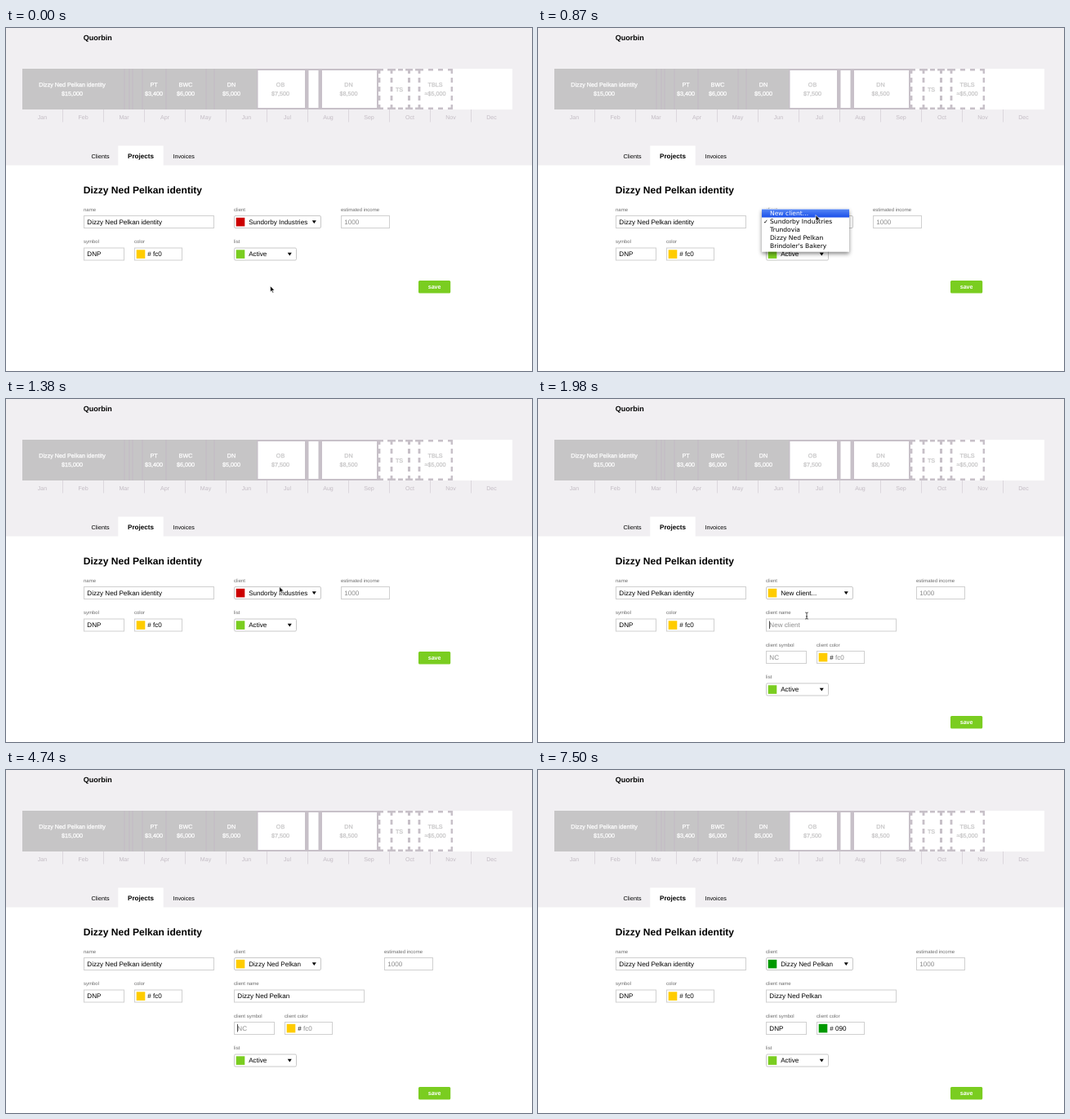
Animation, 644 px wide and 421 px high, one loop 7.53 s. Source, as an HTML page:

```html
<!DOCTYPE html>
<html lang="en">
<head>
<meta charset="utf-8">
<title>Project form</title>
<style>
  html, body { margin: 0; width: 100%; height: 100%; overflow: hidden; background: #fff; }
  svg { display: block; width: 100vw; height: 100vh; }
  text {
    font-family: "Liberation Sans", Arial, sans-serif;
    white-space: pre;
    text-rendering: geometricPrecision;
  }
  .menu text { font-family: "DejaVu Sans", sans-serif; }
</style>
</head>
<body>
<svg id="stage" viewBox="0 0 644 421"></svg>
<script>
const NS = "http://www.w3.org/2000/svg";
const LOOP = 7530;
const stage = document.getElementById("stage");
const PERSON = "Dizzy Ned Pelkan";
const SYMBOL = "DNP";
const PROJECT = PERSON + " identity";
const OLD_CLIENT = "Sundorby Industries";
const NEW_CLIENT = "New client...";
const INK = "#000", GRAY = "#c6c5c6", LILAC = "#c7c0c8", HINT = "#8c8c8c";
const YELLOW = "#fc0", GREEN = "#7acd20";

function add(parent, tag, attrs) {
  const node = document.createElementNS(NS, tag);
  for (const key in attrs) node.setAttribute(key, attrs[key]);
  parent.appendChild(node);
  return node;
}
const group = (parent, attrs = {}) => add(parent, "g", attrs);
const rect = (parent, x, y, width, height, fill, attrs = {}) =>
  add(parent, "rect", { x, y, width, height, fill, ...attrs });
const path = (parent, d, attrs) => add(parent, "path", { d, fill: "none", ...attrs });
function text(parent, x, y, size, content, attrs = {}) {
  const node = add(parent, "text", { x, y, "font-size": size, fill: INK, ...attrs });
  node.textContent = content;
  return node;
}
const bold = { "font-weight": 700 };
const mid = { "text-anchor": "middle" };
const show = (node, on) => node.setAttribute("visibility", on ? "visible" : "hidden");
const move = (node, x, y) => node.setAttribute("transform", `translate(${x} ${y})`);
const setFill = (node, color) => node.setAttribute("fill", color);

// Form parts
const label = (parent, x, y, content) => text(parent, x, y, 6, content, { fill: "#6c6c6c" });
const box = (parent, x, y, w, stroke = "#d0d0d0", rx = 0) =>
  rect(parent, x + .5, y + .5, w - 1, 15, "#fff", { stroke, rx });
const swatchAt = (parent, x, y, color) => rect(parent, x + 2.7, y + 2.8, 10.6, 10.6, color);
function field(parent, x, y, w, name, value, color = INK) {
  label(parent, x, y - 5.5, name);
  box(parent, x, y, w);
  return text(parent, x + 4.3, y + 10.8, 8.1, value, { fill: color });
}
function colorField(parent, x, y, name, value, color) {
  label(parent, x, y - 5.5, name);
  box(parent, x, y, 59);
  const swatch = swatchAt(parent, x, y, YELLOW);
  text(parent, x + 16.3, y + 10.8, 8.1, "#");
  return { swatch, value: text(parent, x + 23, y + 10.8, 8.1, value, { fill: color }) };
}
function select(parent, x, y, w, name, value, color) {
  label(parent, x, y - 5.5, name);
  box(parent, x, y, w, "#c8c8c8", 1.5);
  const swatch = swatchAt(parent, x, y, color);
  const node = text(parent, x + 18.2, y + 10.8, 8.1, value);
  path(parent, `M${x + w - 11.2} ${y + 6.3}h5l-2.5 3.6z`, { fill: INK });
  return { swatch, value: node };
}

// A dashed line that starts and ends with a whole dash
function dashedLine(d, length) {
  const dash = 6, count = Math.round((length + 5) / 11);
  const gap = (length - dash * count) / (count - 1);
  path(stage, d, { stroke: LILAC, "stroke-width": 2.4, "stroke-dasharray": `${dash} ${gap}` });
}

function drawTimeline() {
  rect(stage, 0, 0, 644, 168.5, "#f1eff2");
  text(stage, 94.7, 15.2, 9, "Quorbin", bold);
  rect(stage, 20, 50, 600, 50, "#fff");
  rect(stage, 20, 50, 288, 50, GRAY);
  for (const x of [145, 151, 155, 167, 196, 245, 255]) rect(stage, x - .5, 50, 1, 50, "#c2bac3");
  rect(stage, 307, 50, 149, 50, LILAC);
  for (const [x, w] of [[308.5, 57.5], [370.5, 12], [387, 67]]) rect(stage, x, 52, w, 46, "#fff");

  for (const [left, right] of [[456, 473], [471, 495], [492, 507], [505, 547]]) {
    for (const y of [51.2, 98.8]) dashedLine(`M${left} ${y}H${right}`, right - left);
    for (const x of [left + 1.2, right - 1.2]) dashedLine(`M${x} 50V100`, 50);
  }

  const blocks = [
    [81, PROJECT, "$15,000"], [181, "PT", "$3,400"], [220, "BWC", "$6,000"],
    [276, "DN", "$5,000"], [336, "OB", "$7,500"], [419.5, "DN", "$8,500"],
    [481.5, "TS"], [525.5, "TBLS", "≈$5,000"]
  ];
  for (const [x, name, sum] of blocks) {
    const color = x < 300 ? "#fff" : GRAY;
    const style = { ...mid, fill: color, stroke: color, "stroke-width": .25 };
    text(stage, x, sum ? 71.8 : 77.8, 7.2, name, style);
    if (sum) text(stage, x, 83.2, 7.2, sum, style);
  }
  "Jan Feb Mar Apr May Jun Jul Aug Sep Oct Nov Dec".split(" ").forEach((month, i) => {
    text(stage, 44.5 + i * 50, 111.8, 7.1, month, { ...mid, fill: "#c3bcc4" });
    if (i) rect(stage, 19 + i * 50, 100, 1, 15.5, "#dcd7dd");
  });

  rect(stage, 137.3, 144.5, 55.4, 25, "#fff");
  text(stage, 104.5, 159.7, 7.2, "Clients");
  text(stage, 149, 159.8, 8.1, "Projects", bold);
  text(stage, 204.5, 159.7, 7.2, "Invoices");
}

drawTimeline();
text(stage, 94.7, 202.7, 12.05, PROJECT, bold);
field(stage, 95, 230, 160, "name", PROJECT);
field(stage, 95, 269.5, 50, "symbol", SYMBOL);
colorField(stage, 157, 269.5, "color", "fc0", INK);
const client = select(stage, 279, 230, 107, "client", OLD_CLIENT, "#c00");

const income = group(stage);
field(income, 410, 230, 60, "estimated income", "1000", HINT);
const list = group(stage);
select(list, 279, 269.5, 77, "list", "Active", GREEN);
const save = group(stage);
rect(save, 505, 310, 39.2, 15.6, GREEN, { rx: 1.5 });
text(save, 524.6, 320.3, 7.1, "save", { ...bold, ...mid, fill: "#fff" });

const extra = group(stage);
const nameValue = field(extra, 279, 269.5, 160, "client name", "");
const symbolValue = field(extra, 279, 309, 50, "client symbol", "");
const hex = colorField(extra, 341, 309, "client color", "", HINT);
const caret = rect(stage, 0, 0, .7, 9.5, INK);

// Dropdown menu
const defs = add(stage, "defs");
const blue = add(defs, "linearGradient", { id: "blue", x2: 0, y2: 1 });
add(blue, "stop", { offset: 0, "stop-color": "#5585f4" });
add(blue, "stop", { offset: 1, "stop-color": "#1b50ea" });
const shade = add(defs, "filter", { id: "shade", x: "-20%", y: "-20%", width: "140%", height: "160%" });
add(shade, "feDropShadow", { dx: 0, dy: 2.6, stdDeviation: 2.6, "flood-opacity": .48 });
const ROW = 10;
const menu = group(stage, { class: "menu" });
rect(menu, 274, 222, 107, 52.5, "#fff", { filter: "url(#shade)" });
const bar = rect(menu, 274, 222.5, 107, ROW, "url(#blue)");
const items = [NEW_CLIENT, OLD_CLIENT, "Trundovia", PERSON, "Brindoler's Bakery"]
  .map((name, i) => text(menu, 284, 229.8 + i * ROW, 7.6, name));
const check = text(menu, 276, 239.8, 7, "✓");

// Pointers, both drawn around their hot spot
const arrow = group(stage);
path(arrow, "M0 0V7.6L1.8 6 3 8.8 4.3 8.2 3.1 5.5H5.5Z",
  { fill: "#111", stroke: "#fff", "stroke-width": .7 });
const beam = group(stage);
path(beam, "M-1.8 -4Q0 -4 0 -3Q0 -4 1.8 -4M0 -3V3M-1.8 4Q0 4 0 3Q0 4 1.8 4M-1 1H1",
  { stroke: "#222", "stroke-width": .8 });

const OPEN = 600, CLICK = 1170, EXPAND = 1440, TYPE = 2370;
const route = [
  [0, 323.5, 316.5], [540, 340, 239], [630, 340, 239], [840, 340, 229.5],
  [1170, 340, 229.5], [1380, 334.7, 230.3], [1560, 334.7, 230.3],
  [1980, 329, 266], [2250, 364, 275]
];
const nameTimes = [2370, 2640, 2730, 2880, 2940, 3000, 3150, 3300,
  3450, 3720, 3930, 4080, 4140, 4200, 4380, 4500];
const symbolTimes = [5130, 5220, 5370];
const hexTimes = [6240, 6390, 6540];
const typed = (word, times, t) => word.slice(0, times.filter(time => time <= t).length);

function pointerAt(t) {
  const next = route.findIndex(stop => stop[0] > t);
  if (next < 0) return route[route.length - 1].slice(1);
  const [t0, x0, y0] = route[next - 1], [t1, x1, y1] = route[next];
  const u = (t - t0) / (t1 - t0), k = u * u * (3 - 2 * u);
  return [x0 + (x1 - x0) * k, y0 + (y1 - y0) * k];
}

function fillIn(node, value, hint) {
  node.textContent = value || hint;
  setFill(node, value ? INK : HINT);
}

function drawMenu(t, y) {
  const fade = Math.min(1, Math.max(0, (1380 - t) / 120));
  show(menu, t >= OPEN && fade > 0);
  menu.setAttribute("opacity", fade);
  const row = y < 232.5 ? 0 : 1;
  const lit = t < CLICK || t > CLICK + 60;
  bar.setAttribute("y", 222.5 + row * ROW);
  bar.setAttribute("opacity", lit ? 1 : 0);
  items.forEach((item, i) => setFill(item, lit && i === row ? "#fff" : INK));
  setFill(check, lit && row === 1 ? "#fff" : INK);
}

function draw(t) {
  const [x, y] = pointerAt(t);
  const open = t >= EXPAND;
  const overText = y > 256 && open;
  show(arrow, t < TYPE && !overText);
  show(beam, t < TYPE && overText);
  move(arrow, x, y);
  move(beam, x, y);
  drawMenu(t, y);

  move(income, open ? 53 : 0, 0);
  move(list, 0, open ? 79 : 0);
  move(save, 0, open ? 79 : 0);
  show(extra, open);

  const name = typed(PERSON, nameTimes, t);
  const symbol = typed(SYMBOL, symbolTimes, t);
  const code = typed("090", hexTimes, t);
  fillIn(nameValue, name, "New client");
  fillIn(symbolValue, symbol, "NC");
  fillIn(hex.value, code, "fc0");
  client.value.textContent = open ? name || NEW_CLIENT : OLD_CLIENT;

  // A partial hex code is not a valid color, so the swatch goes blank
  const color = !code ? YELLOW : code.length < 3 ? "#fff" : "#090";
  setFill(hex.swatch, color);
  setFill(client.swatch, open ? color : "#c00");

  const [node, value] = t < 4740 ? [nameValue, name] : t < 5790 ? [symbolValue, symbol] : [hex.value, code];
  const width = value ? node.getComputedTextLength() : 0;
  caret.setAttribute("x", +node.getAttribute("x") + width);
  caret.setAttribute("y", +node.getAttribute("y") - 7.8);
  show(caret, open && t < 6990);
}

function tick() {
  draw(performance.now() % LOOP);
  requestAnimationFrame(tick);
}
tick();
</script>
</body>
</html>
```
